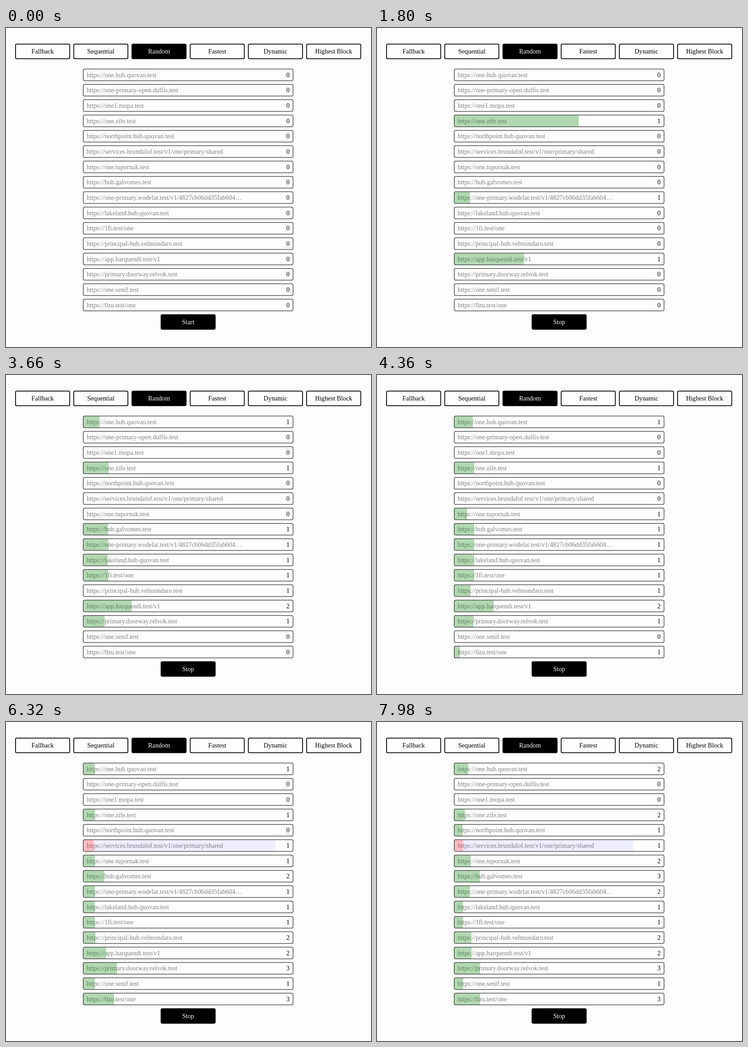
Recreate the animation shown at these times as an HTML page. Size 800 by 700 pixels, loop 8 s.

```html
<!DOCTYPE html>
<html lang="en">
<head>
<meta charset="utf-8">
<title>Endpoint strategies</title>
<style>
  html, body { margin: 0; width: 100%; height: 100%; overflow: hidden; background: #fdfdfd; }
  svg { display: block; }
  text { font: 16px "Liberation Serif", "Times New Roman", serif; }
  .mid { text-anchor: middle; }
  .end { text-anchor: end; }
  .url { fill: #808080; }
  .box { fill: none; stroke: #000; }
  .green { fill: rgba(0, 128, 0, .3); }
  .red { fill: rgba(255, 0, 20, .26); }
  .blue { fill: rgba(0, 0, 255, .06); }
</style>
</head>
<body>
<svg id="stage" width="800" height="700" viewBox="0 0 800 700">
  <g id="app" transform="translate(399.2 34.6) scale(.886)"></g>
</svg>
<script>
const LOOP = 8000;
const TABS = ['Fallback', 'Sequential', 'Random', 'Fastest', 'Dynamic', 'Highest Block'];
const HOSTS = [
  'one.hub.quovan.test',
  'one-primary-open.dulfis.test',
  'one1.mopa.test',
  'one.zife.test',
  'northpoint.hub.quovan.test',
  'services.brundalof.test/v1/one/primary/shared',
  'one.tupornak.test',
  'hub.galvomes.test',
  'one-primary.wodelat.test/v1/4827cb06dd35fab604…',
  'lakeland.hub.quovan.test',
  '1fi.test/one',
  'principal-hub.velmondaro.test',
  'app.harquendi.test/v1',
  'primary.doorway.relvok.test',
  'one.senif.test',
  '0zu.test/one'
];

// Each answered request: [tick, row]
const EVENTS = [
  [14, 3], [26.1, 12], [32.7, 8], [38.7, 10], [44.7, 7], [50.7, 9], [57, 12],
  [63.4, 13], [69.7, 0], [76.5, 11], [82.2, 6], [87.9, 15], [93.5, 14],
  [99.2, 13], [104.9, 13], [110.3, 15], [115.5, 5], [120.3, 7], [124.9, 15],
  [132.3, 11], [137.9, 7], [143.4, 4], [149, 6], [154.5, 8], [160, 0], [165.6, 3]
];
const START_TICK = 14;
const EASE_TICKS = 10.8;
const ROW_W = 520, ROW_H = 30, ROW_STEP = 38, INNER_W = ROW_W - 2;
const FAILED_ROW = 5, FAIL_TICK = 115.5;

const app = document.getElementById('app');

function add(tag, attrs, label = '') {
  const el = document.createElementNS('http://www.w3.org/2000/svg', tag);
  for (const key in attrs) el.setAttribute(key, attrs[key]);
  el.textContent = label;
  return app.appendChild(el);
}

function button(x, y, label, filled) {
  add('rect', { x: x + 1, y: y + 1, width: 134, height: 36, rx: 3,
    fill: filled ? '#000' : 'none', stroke: '#000', 'stroke-width': 2 });
  return add('text', { x: x + 68, y: y + 24.4, class: 'mid', fill: filled ? '#fdfdfd' : '#000' }, label);
}

function bar(y, kind) {
  return add('rect', { x: 1 - ROW_W / 2, y: y + 1, width: 0, height: ROW_H - 2, rx: 0, class: kind });
}

TABS.forEach((label, i) => button(i * 144 - 428, 0, label, label === 'Random'));

const rows = HOSTS.map((host, i) => {
  const y = 62 + i * ROW_STEP, left = -ROW_W / 2;
  add('text', { x: left + 9, y: y + 20.4, class: 'url' }, 'https://' + host);
  const count = add('text', { x: -left - 9, y: y + 20.4, class: 'end' }, '0');
  const fill = bar(y, i === FAILED_ROW ? 'red' : 'green');
  const rest = i === FAILED_ROW ? bar(y, 'blue') : null;
  add('rect', { x: left + .5, y: y + .5, width: ROW_W - 1, height: ROW_H - 1, rx: 3.5,
    class: 'box', 'stroke-width': 1.15 });
  return { count, fill, rest };
});

const toggle = button(-68, 62 + HOSTS.length * ROW_STEP, 'Start', true);

// Ticks come in threes: two short holds, then a long one.
function tickAt(ms) {
  const group = Math.floor((ms - 120) / 140);
  const within = ms - 120 - group * 140;
  return group * 3 + (within < 20 ? 0 : within < 40 ? 1 : 2);
}

function ease(x) {
  const c = Math.min(1, Math.max(0, x));
  return c * c * (3 - 2 * c);
}

// Every answer restarts the easing of all bars toward their new share.
function sharesAt(tick) {
  const counts = HOSTS.map(() => 0);
  let shares = HOSTS.map(() => 0);
  EVENTS.forEach(([at, row], i) => {
    if (at > tick) return;
    counts[row]++;
    const until = i + 1 < EVENTS.length ? Math.min(tick, EVENTS[i + 1][0]) : tick;
    const p = ease((until - at) / EASE_TICKS);
    shares = shares.map((s, r) => s + (counts[r] / (i + 1) - s) * p);
  });
  return { counts, shares };
}

function draw(ms) {
  const tick = tickAt(ms);
  const { counts, shares } = sharesAt(tick);
  toggle.textContent = tick < START_TICK ? 'Start' : 'Stop';
  rows.forEach(({ count, fill, rest }, i) => {
    const width = shares[i] * INNER_W;
    count.textContent = counts[i];
    fill.setAttribute('width', width);
    if (!rest) return;
    const reach = tick < FAIL_TICK ? 0 : 492 - (tick - FAIL_TICK) * .935;
    rest.setAttribute('x', 1 - ROW_W / 2 + width);
    rest.setAttribute('width', Math.max(0, reach - width));
  });
}

const begin = performance.now();
function loop() {
  draw((performance.now() - begin) % LOOP);
  requestAnimationFrame(loop);
}
loop();
</script>
</body>
</html>
```
